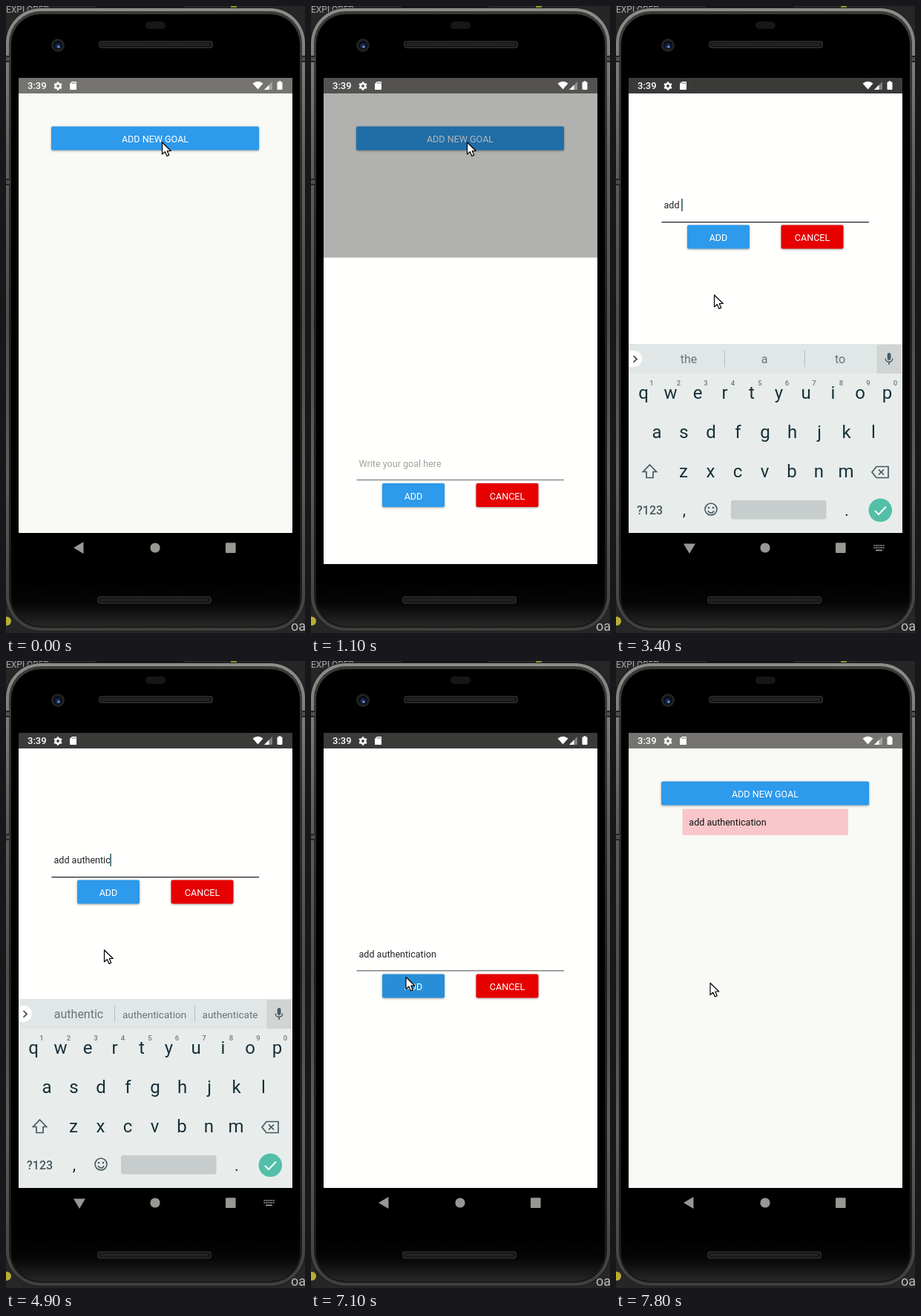
Recreate the animation shown at these times as an HTML page with a canvas. Size 403 by 846 pixels, loop 8 s.

```html
<!DOCTYPE html>
<html lang="en">
<head>
<meta charset="utf-8">
<title>Goal list on a phone</title>
<style>
html, body { margin: 0; width: 100%; height: 100%; overflow: hidden; background: #262627; }
canvas { display: block; width: 403px; height: 846px; }
</style>
</head>
<body>
<canvas id="stage" width="403" height="846"></canvas>
<script>
const g = document.getElementById('stage').getContext('2d');
const LOOP = 8000, STEP = 100;
const FONT = 'Roboto, "Noto Sans", sans-serif';
const BLUE = '#2d9aeb', SHEET = '#fffffd', INK = '#173039', GREY = '#979793';

// [time, value]: the last entry that has begun is in force
const typed = [
  [0, ''], [3300, 'ad'], [3400, 'add '], [3800, 'add au'], [3900, 'add aut'],
  [4100, 'add authe'], [4300, 'add authent'], [4500, 'add authenti'],
  [4800, 'add authentic'], [5300, 'add authentica'], [5600, 'add authenticat'],
  [5700, 'add authenticati'], [5800, 'add authenticatio'], [6000, 'add authentication']
];
const hints = [
  [0, 'I,the,you'], [3300, 'ad,add,and'], [3400, 'the,a,to'], [3800, 'au,a,at'],
  [3900, 'aut,out,auto'], [4100, 'authe,authentic,authentication'],
  [4300, 'authent,authentic,authentication'], [4600, 'authenti,authentic,authentication'],
  [4900, 'authentic,authentication,authenticate'],
  [5700, 'authentication,authenticate,authenticated'],
  [6100, 'authentication,authentications,']
];
const at = (list, t) => list.filter(e => e[0] <= t).pop()[1];
const ramp = (t, from, span) => Math.min(1, Math.max(0, (t - from) / span));
const ease = p => (1 - Math.cos(Math.PI * p)) / 2;

function rect(x, y, w, h, color, r = 0) {
  g.fillStyle = color;
  g.beginPath();
  g.roundRect(x, y, w, h, r);
  g.fill();
}
function disc(x, y, r, color) {
  g.fillStyle = color;
  g.beginPath();
  g.arc(x, y, r, 0, 7);
  g.fill();
}
function trace(points, closed) {
  g.beginPath();
  for (let i = 0; i < points.length; i += 2) g.lineTo(points[i], points[i + 1]);
  if (closed) g.closePath();
}
function poly(points, color) {
  trace(points, true);
  g.fillStyle = color;
  g.fill();
}
function line(points, color, width = 1, closed = false) {
  trace(points, closed);
  g.strokeStyle = color;
  g.lineWidth = width;
  g.stroke();
}
function text(str, x, y, size, color, align = 'left', weight = 400) {
  g.font = `${weight} ${size}px ${FONT}`;
  g.textAlign = align;
  g.fillStyle = color;
  g.fillText(str, x, y);
}
function gradient(y0, y1, ...stops) {
  const fill = g.createLinearGradient(0, y0, 0, y1);
  stops.forEach((c, i) => fill.addColorStop(i / (stops.length - 1), c));
  return fill;
}
function clipped(x, y, w, h, draw) {
  g.save();
  g.beginPath();
  g.rect(x, y, w, h);
  g.clip();
  draw();
  g.restore();
}
function button(label, x, y, w, color) {
  g.save();
  g.shadowColor = 'rgba(0,0,0,.36)';
  g.shadowBlur = 3;
  g.shadowOffsetY = 1;
  rect(x, y, w, 32, color, 2);
  g.restore();
  text(label, x + w / 2, y + 21.5, 12.57, '#fff', 'center');
}

function grille(x, y) {
  rect(x, y, 154, 10, '#2c2c2a', 4);
  rect(x + 1.5, y + 1.5, 151, 7, '#151513', 3);
  g.setLineDash([1, 1]);
  line([x + 4, y + 5, x + 150, y + 5], '#2e2e2c', 4);
  g.setLineDash([]);
}
function phone() {
  rect(0, 0, 403, 846, '#262627');
  text('EXPLORER', 0, 9, 12, '#a5a5a5');
  rect(122, 0, 117, 3, '#141414');
  disc(307, 2, 4, '#8f9425');
  disc(1, 830, 6, '#b9ad35');
  text('oa', 384, 843, 18, '#bcbcbc');
  rect(-1, 2, 405, 842, '#1d1d1c', 48);
  rect(0, 3, 403, 840, gradient(3, 843, '#8d8d89', '#5d5d5a', '#4d4d4a', '#5d5d5a', '#3f3f3d'), 47);
  rect(4, 7, 395, 832, gradient(7, 839, '#3a3a38', '#1e1e1d', '#1a1a19'), 43);
  rect(7, 11, 389, 826, '#000', 40);
  rect(7, 775, 389, 62, gradient(775, 837, '#000', '#060606', '#272726'), [0, 0, 40, 40]);
  for (const [x, y] of [[0, 67], [399, 67], [0, 233]]) {
    rect(x, y, 5, 9, '#242423');
    rect(x, y + 2, 5, 5, '#4f4f4d');
  }
  rect(188, 21, 27, 10, '#171717', 5);
  disc(70, 53, 9, '#222223');
  disc(70, 53, 6, '#0b0e19');
  disc(70, 54, 3.5, '#172a56');
  disc(71, 55, 1.6, '#7e99cc');
  grille(125, 47);
  grille(123, 796.5);
}

function statusIcons() {
  const W = '#fff';
  text('3:39', 29, 112, 13, W, 'left', 500);
  g.strokeStyle = W;
  g.lineWidth = 2.6;
  g.beginPath();
  g.arc(70, 108, 3.2, 0, 7);
  g.stroke();
  for (let i = 0; i < 6; i++) {
    const a = i * Math.PI / 3 + Math.PI / 6, c = Math.cos(a), s = Math.sin(a);
    line([70 + 3 * c, 108 + 3 * s, 70 + 5.7 * c, 108 + 5.7 * s], W, 2.4);
  }
  poly([89, 102, 95, 102, 95, 113, 86, 113, 86, 105], W);
  for (const x of [89, 91, 93]) rect(x, 103, 1, 2, '#777');
  g.fillStyle = W;
  g.beginPath();
  g.moveTo(339.5, 112.5);
  g.lineTo(332.5, 104.5);
  g.quadraticCurveTo(339.5, 99, 346.5, 104.5);
  g.fill();
  poly([348, 113, 359, 102, 359, 113], 'rgba(255,255,255,.35)');
  poly([348, 113, 354.5, 106.5, 354.5, 113], W);
  rect(365.5, 102.5, 7, 10.5, W, 1);
  rect(367.5, 101.3, 3, 2, W);
}

function nav(keyboardUp, switcher) {
  rect(17, 711, 369, 42, '#000');
  poly(keyboardUp ? [91, 725.5, 107, 725.5, 99, 739] : [91, 731, 104.5, 723, 104.5, 739], GREY);
  disc(201, 731, 6.6, GREY);
  rect(296, 724.3, 13.6, 13.6, GREY, 1);
  if (!switcher) return;
  for (let i = 0; i < 12; i++) rect(347.5 + i % 6 * 2.5, 727 + (i / 6 | 0) * 3, 1.6, 1.8, GREY);
  rect(350, 733.5, 9, 1.8, GREY);
}

function home(hasGoal) {
  rect(17, 97, 369, 21, '#757470');
  rect(17, 118, 369, 593, '#f9faf6');
  button('ADD NEW GOAL', 61, 162.5, 280, BLUE);
  if (hasGoal) {
    rect(89.5, 199.5, 223.5, 35.5, '#f9c7cb');
    text('add authentication', 98.3, 221.5, 12.57, '#111');
  }
}

function form(t, top, shift) {
  rect(17, top, 369, 593, SHEET);
  const y = top - 118 + shift, str = at(typed, t), focus = t >= 2600 && t < 6400;
  text(str || 'Write your goal here', 64.5, y + 400, 12.57, str ? '#222' : '#a0a09d');
  if (focus && t < 6300) {
    const w = str ? g.measureText(str).width : 0;
    rect(64 + w, y + 387, 1.6, 17, '#30606f');
  }
  rect(61.5, y + (focus ? 418 : 417.3), 279.5, 1.2, focus ? '#222' : '#696967');
  button('ADD', 96, y + 422.5, 84, t >= 6300 ? '#288ed8' : BLUE);
  button('CANCEL', 222.5, y + 422.5, 84, '#e60000');
}

function keyboard(t) {
  rect(17, 456, 369, 255, '#e8edec');
  rect(17, 456, 369, 40, '#e1e6e6');
  rect(351.5, 457, 33, 39, '#d0d5d4');
  rect(146, 465, 1, 22, '#b7bdbd');
  rect(254, 465, 1, 22, '#b7bdbd');
  rect(17, 465, 18, 22, '#fff', [0, 11, 11, 0]);
  line([23.5, 472, 28, 476.3, 23.5, 480.6], '#37474f', 1.7);
  at(hints, t).split(',').forEach((word, i) => {
    text(word, [98, 200, 302][i], 482.3, word.length > 10 ? 13.5 : 16, '#6a7477', 'center');
  });

  // microphone
  rect(365.7, 468, 4.8, 10, '#455a64', 2.4);
  g.beginPath();
  g.arc(368, 475.5, 4.8, 0, Math.PI);
  g.strokeStyle = '#455a64';
  g.lineWidth = 1.4;
  g.stroke();
  line([368, 480, 368, 484], '#455a64', 1.6);

  const rows = [['qwertyuiop', 37, 530], ['asdfghjkl', 55, 582.5], ['zxcvbnm', 91, 635.5]];
  rows.forEach(([keys, x, y], row) => [...keys].forEach((key, i) => {
    const kx = x + i * 36.5;
    text(key, kx, y, 24, INK, 'center');
    if (!row) text((i + 1) % 10, kx + 11, 512.3, 9.5, '#6d787b', 'center', 500);
  }));

  const edge = '#46575e';
  line([45.5, 619, 54.5, 628.5, 50, 628.5, 50, 636.5, 41, 636.5, 41, 628.5, 36.5, 628.5], edge, 1.7, true);
  line([345, 629, 351, 621.5, 367, 621.5, 367, 636.5, 351, 636.5], edge, 1.7, true);
  line([354, 625.5, 361, 632.5], edge, 1.7);
  line([361, 625.5, 354, 632.5], edge, 1.7);

  text('?123', 28, 685.5, 16, edge, 'left', 500);
  text(',', 92, 687, 22, INK, 'center');
  text('.', 311, 688, 22, INK, 'center');
  g.strokeStyle = edge;
  g.lineWidth = 1.6;
  g.beginPath();
  g.arc(128, 679, 8, 0, 7);
  g.stroke();
  g.beginPath();
  g.arc(128, 680, 4, .25, Math.PI - .25);
  g.stroke();
  disc(125, 677, 1.3, edge);
  disc(131, 677, 1.3, edge);
  rect(155, 667, 128.5, 25.5, '#c7cccc', 3);
  disc(356.3, 680.3, 15.8, '#53bfa8');
  line([349, 681, 354, 686, 364, 675.5], '#fff', 2);
}

function pointer(t) {
  const a = ease(ramp(t, 1740, 360)), b = ease(ramp(t, 6840, 360));
  g.save();
  g.translate(210.5 - 78 * a - 5.5 * b, 184 + 206 * a + 44.5 * b);
  g.lineJoin = 'round';
  const arrow = [0, 0, 0, 16, 3.8, 12.6, 6.4, 18.4, 9.2, 17.2, 6.8, 11.5, 11.8, 11.5];
  poly(arrow, '#fff');
  line(arrow, '#000', 1.2, true);
  g.restore();
}

function screen(t) {
  const open = ramp(t, 890, 310), close = ramp(t, 7440, 266) ** 2;
  const drop = open < 1 ? 636 * (1 - open ** 1.1) : 636 * close;
  const dim = open < 1 ? .5 * open ** 1.4 : .5 * Math.max(0, 1 - close * 1.17);
  const keys = t < 6400 ? ramp(t, 2550, 300) : 0;

  home(t >= 7400);
  rect(17, 97, 369, 614, `rgba(0,0,0,${dim})`);
  nav(t >= 2600 && t < 6300, t >= 2800 && t < 6300);
  if (open > 0 && t < 7800) form(t, 118 + drop, t >= 2800 && t < 6400 ? -127 : 0);
  if (keys > 0) {
    clipped(17, 118, 369, 593, () => {
      g.globalAlpha = keys;
      g.translate(0, 60 * (1 - keys) ** 2);
      keyboard(t);
    });
  }
  statusIcons();
}

function frame() {
  const t = Math.floor((performance.now() - begin) % LOOP / STEP) * STEP;
  phone();
  clipped(17, 97, 369, 656, () => screen(t));
  pointer(t);
  requestAnimationFrame(frame);
}

const begin = performance.now();
frame();
</script>
</body>
</html>
```
